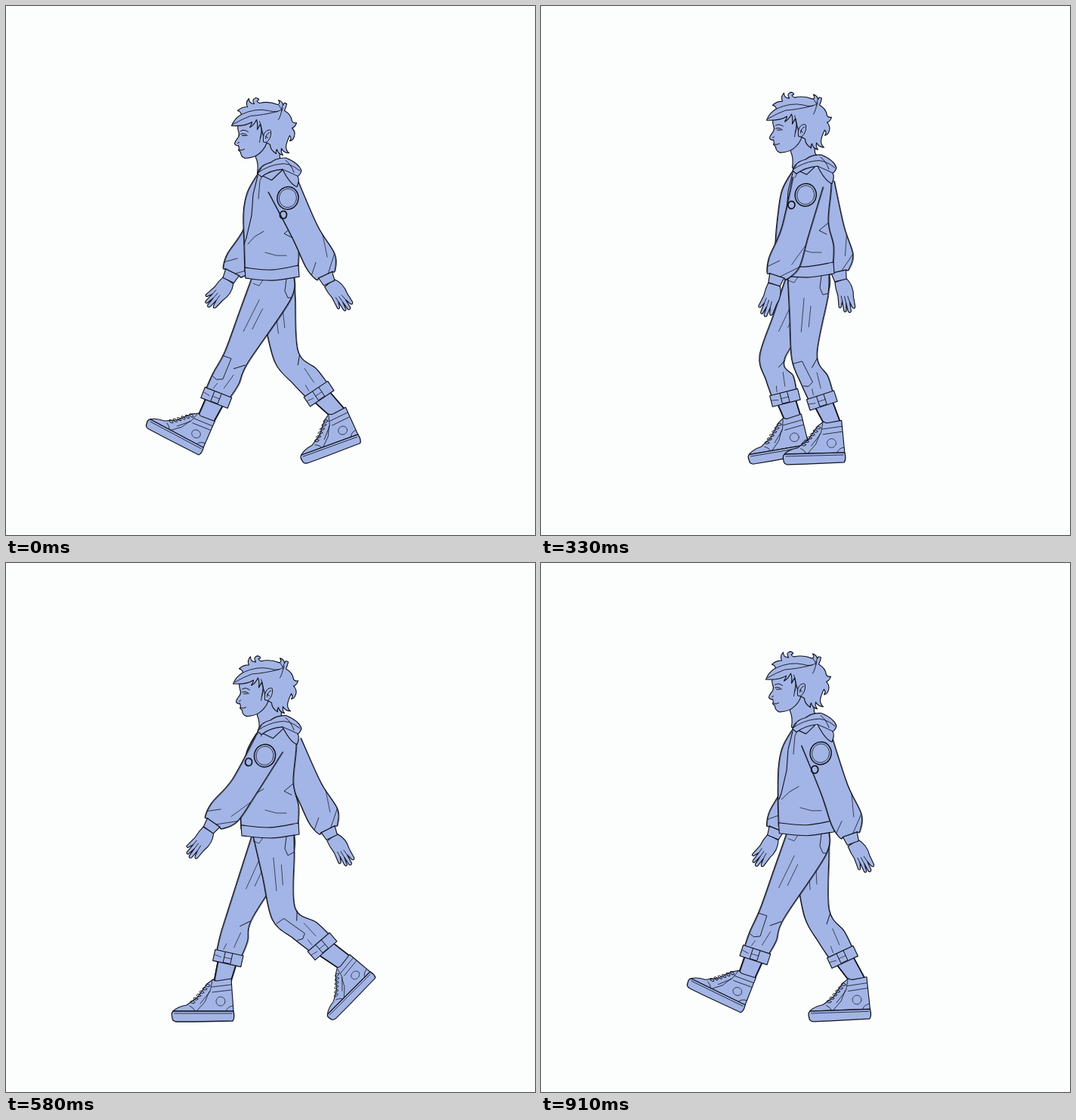
An HTML page with a canvas that plays this animation: 700 px wide and 700 px high, repeating every 1 s.

```html
<!DOCTYPE html>
<html lang="en">
<head>
<meta charset="utf-8">
<title>Walk cycle</title>
<style>
html, body { margin: 0; width: 100%; height: 100%; overflow: hidden; background: #fcfefd; }
canvas { display: block; width: 100vw; height: 100vh; }
</style>
</head>
<body>
<canvas id="stage" width="700" height="700"></canvas>
<script>
const ctx = document.getElementById('stage').getContext('2d');
const PAPER = '#fcfefd', BLUE = '#a3b5e6', INK = '#12141d';
const STEPS = 12, LOOP = 1000, FLOOR = 607, KNEE_Y = 464;
const RAD = Math.PI / 180, STEP_ANGLE = 360 / STEPS;

const cosd = deg => Math.cos(deg * RAD);
const sind = deg => Math.sin(deg * RAD);
const polar = deg => [cosd(deg), sind(deg)];
const clamp = v => Math.max(0, Math.min(1, v));
const mix = (a, b, t) => a.map((v, i) => v + (b[i] - v) * t);
const add = (a, b, k = 1) => [a[0] + b[0] * k, a[1] + b[1] * k];
const turn = ([x, y]) => [-y, x];
const unit = (a, b) => {
  const d = Math.hypot(b[0] - a[0], b[1] - a[1]) || 1;
  return [(b[0] - a[0]) / d, (b[1] - a[1]) / d];
};

// Value that runs straight from key to key and wraps around the cycle.
const track = (...keys) => k => {
  const ring = [...keys, [STEPS, keys[0][1]]];
  const n = ring.findIndex(key => key[0] > k);
  const [a, va] = ring[n - 1], [b, vb] = ring[n];
  return va + (vb - va) * (k - a) / (b - a);
};

// Heel strike at 0, flat from 1 to 5, toe-off at 7, swing until 11.
const toeX = track([0, 183], [1, 219], [5, 354], [7, 432], [8, 420], [9, 360], [11, 191]);
const footTilt = track([0, 28], [1, 0], [5, -2], [6, -20], [7, -45], [8, -56], [9, -45], [11, 26]);
const kneeX = track([0, 305], [2, 315], [5, 365], [6.5, 374], [8, 354], [9, 324], [10, 306]);

const rise = k => (cosd(2 * STEP_ANGLE * (k - 0.8)) - 1) / 2;
const sway = k => 0.5 + 2 * cosd(2 * STEP_ANGLE * (k - 2));
const swing = k => cosd(STEP_ANGLE * k - 5);

const art = {
  sole: 'M1-5Q-1-13 3-14L82-14Q84-5 81-1L30 0L6 0Q1-1 1-5Z',
  upper: 'M2-14Q8-20 20-22L34-32L47-50L55-56Q57-54 60-54L79-57L80-42L82-14Z',
  seams: 'M24-21Q30-18 31-14M33-14L44-26L50-40M53-46L79-49M54-39L79-42M72-14Q74-20 81-21M54-54L51-40L38-24M4-11L80-11',
  hand: 'M0-8C8-12 18-12 26-9L39-7Q43-5 39-3L31-2L43 0Q46 3 42 4L31 3L41 6Q43 9 39 9' +
    'L27 7L34 11Q35 15 30 13L18 10Q8 10 0 8Z',
  knuckles: 'M31-2L23-2M31 3L22 2M27 7L20 6',
  neck: 'M345 165L331 194L331 202Q335 210 333 223L352 232L370 215L363 203L362 180Z',
  face: 'M309 152Q306 162 308 167Q310 171 308 175Q303 181 303 184Q305 187 308 186L309 190L308 192' +
    'L311 195Q311 201 317 203Q329 202 334 198Q342 192 345 184L356 150Z',
  hair: 'M299 160Q303 150 312 145Q311 141 307 140Q312 135 320 135Q317 129 322 124Q322 131 329 131' +
    'Q325 125 331 123Q336 124 335 126Q330 127 336 130Q348 127 360 132Q364 131 361 126' +
    'Q367 128 367 133Q368 128 372 131Q371 136 369 140Q378 145 379 154Q381 157 385 156' +
    'Q383 162 379 163Q384 168 382 174Q380 180 376 180Q379 177 376 173Q372 181 371 187' +
    'Q371 193 375 196Q368 196 365 190Q364 195 367 199Q360 197 359 191Q357 194 358 197' +
    'Q350 192 350 185L343 181L339 166L337 158L333 165Q334 157 332 152Q328 160 323 162' +
    'Q326 158 326 155Q317 161 299 160Z',
  locks: 'M312 145Q331 136 348 140Q360 144 367 137M301 158Q313 151 324 147Q340 146 360 141' +
    'M366 134Q365 146 361 152M361 132Q364 136 366 140M336 154Q341 164 337 177M339 165L336 182',
  ear: 'M341 181Q340 170 345 167Q350 164 351 167Q352 177 345 182ZM344 177Q345 170 349 169M344 174L347 176',
  features: 'M311 167Q316 164 321 168M311 171Q316 169 320 173M313 173L318 173M309 192Q313 193 316 191M307 183L309 182',
  hood: 'M333 223Q335 212 350 208Q359 201 371 202Q388 209 391 219Q389 225 386 226Q389 231 385 240' +
    'Q376 237 366 217Q350 218 338 227Z',
  folds: 'M334 221Q347 212 362 210Q374 207 389 219M366 217Q376 221 386 226M370 205Q377 210 381 221M338 215L333 223'
};
for (const k in art) art[k] = new Path2D(art[k]);

function ink(path, w = 1.15) {
  ctx.strokeStyle = INK;
  ctx.lineWidth = w;
  ctx.stroke(path);
}

function paint(path, w) {
  ctx.fillStyle = BLUE;
  ctx.fill(path);
  ink(path, w);
}

function curve(path, pts, join) {
  path[join ? 'lineTo' : 'moveTo'](...pts[0]);
  for (let i = 0; i < pts.length - 1; i++) {
    const a = pts[i - 1] || pts[i], b = pts[i], c = pts[i + 1], d = pts[i + 2] || c;
    path.bezierCurveTo(b[0] + (c[0] - a[0]) / 6, b[1] + (c[1] - a[1]) / 6,
      c[0] - (d[0] - b[0]) / 6, c[1] - (d[1] - b[1]) / 6, ...c);
  }
}

// Fill between two edges; only the edges get a loose double line.
function tube(front, back) {
  const body = new Path2D(), edge = new Path2D();
  curve(body, front);
  curve(body, [...back].reverse(), true);
  ctx.fillStyle = BLUE;
  ctx.fill(body);
  curve(edge, front);
  curve(edge, back);
  ink(edge);
  ctx.save();
  ctx.translate(0.9, 0.5);
  ink(edge, 0.6);
  ctx.restore();
}

function poly(pts, closed) {
  const p = new Path2D();
  pts.forEach((v, i) => p[i ? 'lineTo' : 'moveTo'](...v));
  if (closed) p.closePath();
  return p;
}
const line = (pts, w = 0.7) => ink(poly(pts), w);

function oval(x, y, rx, ry, w, draw = ink) {
  const p = new Path2D();
  p.ellipse(x, y, rx, ry, 0.2, 0, 7);
  draw(p, w);
}

function at(origin, dir, draw, tall = 1) {
  ctx.save();
  ctx.transform(dir[0], dir[1], -dir[1] * tall, dir[0] * tall, ...origin);
  draw();
  ctx.restore();
}

function shoe() {
  paint(art.upper);
  paint(art.sole, 1.3);
  ink(art.seams, 0.8);
  oval(65, -27, 6, 6, 0.7, paint);
  for (let i = 0; i < 6; i++) oval(28 + i * 4, -26 - i * 4.4, 3, 1.6, 0.9);
}

function leg(k, dy, near) {
  const tilt = footTilt(k), dir = polar(tilt);
  const tall = 1 - 0.25 * Math.abs(sind(tilt));
  const toe = [toeX(k), FLOOR - 107 * Math.max(0, sind(tilt))];
  const onShoe = (x, y) => add(add(toe, dir, x), turn(dir), y * tall);

  const hipF = [326, 358 + dy], hipB = [381, 358 + dy];
  const hip = mix(hipF, hipB, 0.5), knee = [kneeX(k), KNEE_Y], ankle = onShoe(66, -54);
  const shinDir = unit(knee, ankle);
  const bend = unit([0, 0], add(unit(hip, knee), shinDir));
  const kF = add(knee, turn(bend), 17), kB = add(knee, turn(bend), -17);

  const lean = Math.atan2(shinDir[0], shinDir[1]) / RAD * 0.8;
  const across = polar(-lean), down = turn(across);
  const ringMid = mix(knee, ankle, 0.58);
  const cF = add(ringMid, across, -17), cB = add(ringMid, across, 17);
  const top = [add(cF, across, -2), add(cB, across, 2)];
  const low = top.map(p => add(p, down, 15));
  const hem = (u, v) => mix(mix(top[0], top[1], u), mix(low[0], low[1], u), v);

  const sockF = [hem(0.17, 0.5), onShoe(56, -52)], sockB = [hem(0.83, 0.5), onShoe(78, -52)];
  tube(sockF, sockB);
  line(sockF, 1.5);
  line(sockB, 1.5);
  at(toe, dir, shoe, tall);

  const ahead = clamp((381 - kB[0]) / 60);
  const seat = add(mix(hipB, kB, 0.28), [12 * ahead, 0]);
  tube([hipF, mix(hipF, kF, 0.5), kF, add(mix(kF, cF, 0.6), across, -1), cF],
    [hipB, seat, kB, add(mix(kB, cB, 0.6), across, 2), cB]);

  const shin = (u, v) => mix(mix(kF, kB, u), mix(cF, cB, u), v);
  const thigh = (u, v) => mix(mix(hipF, hipB, u), mix(kF, kB, u), v);
  line([thigh(0.42, 0.3), thigh(0.36, 0.7)]);
  line([thigh(0.62, 0.4), thigh(0.6, 0.65)]);
  line([shin(0.95, 0.1), shin(0.62, 0.3)], 1);
  line([shin(0.72, 0.45), shin(0.62, 0.85)]);
  line([shin(0.3, 0.8), shin(0.25, 0.95)]);
  if (near) {
    line([shin(0, 0.12), shin(0.35, 0.1), shin(0.42, 0.65), shin(0.2, 0.72), shin(0.02, 0.68)], 0.9);
    line([[371, 362 + dy], [369, 378 + dy], [373, 387 + dy], mix(hipB, seat, 0.9)], 0.9);
    line([[327, 368 + dy], [335, 371 + dy], [341, 362 + dy]]);
  }
  paint(poly([top[0], top[1], low[1], low[0]], true));
  line([hem(0.36, 0.05), hem(0.36, 0.95), hem(0.62, 0.95), hem(0.62, 0.05)], 1);
  line([hem(0.36, 0.5), hem(0.62, 0.5)]);
  line([hem(0.03, 0.45), hem(0.25, 0.55)]);
}

function hand() {
  paint(art.hand);
  ink(art.knuckles, 0.8);
}

// s runs from 1 (arm fully back) to -1 (fully forward).
function arm(s, shoulder, wrist) {
  const axis = unit(shoulder, wrist), front = turn(axis);
  const end = add(wrist, axis, -12);
  const elbow = add(mix(shoulder, end, 0.52), front, -3 * (1 - s));
  const puff = add(mix(elbow, end, 0.68), front, -2);
  const side = f => [
    add(shoulder, front, 21 * f), add(elbow, front, 18.5 * f),
    add(puff, front, 21 * f), add(end, front, 14 * f), add(end, front, 10 * f)
  ];
  const F = side(1), B = side(-1);
  at(wrist, polar(87 - 38 * s), hand);
  paint(poly([F[4], B[4], add(wrist, front, -8), add(wrist, front, 8)], true));
  tube(F, B);
  line([F[4], B[4]], 1.1);
  line([B[2], mix(F[3], B[3], 0.65)], 0.8);
  line([mix(B[1], B[2], 0.3), mix(F[2], B[2], 0.75)]);
  line([mix(F[2], F[3], 0.6), mix(F[2], B[2], 0.35)], 0.8);
}

function badge(s, dy) {
  const c = [357 + 16 * s, 255 + dy];
  const dot = add(c, polar(133 - 28 * s), 23);
  oval(...c, 14, 15, 1.5);
  oval(...c, 11.5, 12.5, 0.8);
  oval(...dot, 4.5, 5, 1.8);
}

function torso(s) {
  const hx = 311 + 5 * Math.max(0, s) ** 2;
  tube([[338, 219], [331, 226], [319, 248], [314, 275], [hx - 1, 318], [hx, 352]],
    [[378, 219], [384, 240], [380, 290], [387, 322], [386, 350]]);
  line([[333, 226], [327, 250], [325, 278], [318, 308], [315, 316]], 1.1);
  line([[341, 222], [336, 232], [334, 256]], 0.8);
  line([[hx + 4, 316], [329, 306], [341, 299]], 0.8);
  line([[380, 292], [368, 302], [378, 307]], 0.9);
  line([[343, 327], [358, 331], [371, 331]]);
  const band = new Path2D();
  curve(band, [[hx, 347], [(hx + 387) / 2, 350], [387, 344]]);
  curve(band, [[388, 359], [352, 364], [hx + 1, 361]], true);
  band.closePath();
  paint(band);
}

function hood() {
  paint(art.hood);
  ink(art.folds, 0.9);
}

function head() {
  paint(art.face);
  paint(art.hair);
  ink(art.locks, 0.9);
  paint(art.ear, 1);
  ink(art.features, 1);
}

function draw(k) {
  const s = swing(k), dy = 5 * rise(k);
  const body = [0, dy], skull = [sway(k), 9 * rise(k)], level = [1, 0];
  const reach = 344 + 84 * s;
  ctx.fillStyle = PAPER;
  ctx.fillRect(0, 0, 700, 700);
  ctx.lineJoin = ctx.lineCap = 'round';

  arm(-s, [364 - 8 * s, 241 + dy], [366 - 72 * s, 363]);
  leg((k + STEPS / 2) % STEPS, dy, false);
  leg(k, dy, true);
  at(body, level, () => torso(s));
  arm(s, [357 + 9 * s, 238 + dy], [reach, 376 - (reach - 365) ** 2 / 416]);
  badge(s, dy);
  at(skull, level, () => paint(art.neck));
  at(body, level, hood);
  at(skull, level, head);
}

// Each drawing is held; changes fall on whole hundredths of a second.
const startOf = i => Math.floor(i * 100 / STEPS) * 10;
let t0 = null, shown = -1;
function tick(now) {
  if (t0 === null) t0 = now;
  const t = (now - t0) % LOOP;
  let i = STEPS - 1;
  while (startOf(i) > t) i--;
  if (i !== shown) draw(shown = i);
  requestAnimationFrame(tick);
}
draw(0);
requestAnimationFrame(tick);
</script>
</body>
</html>
```
